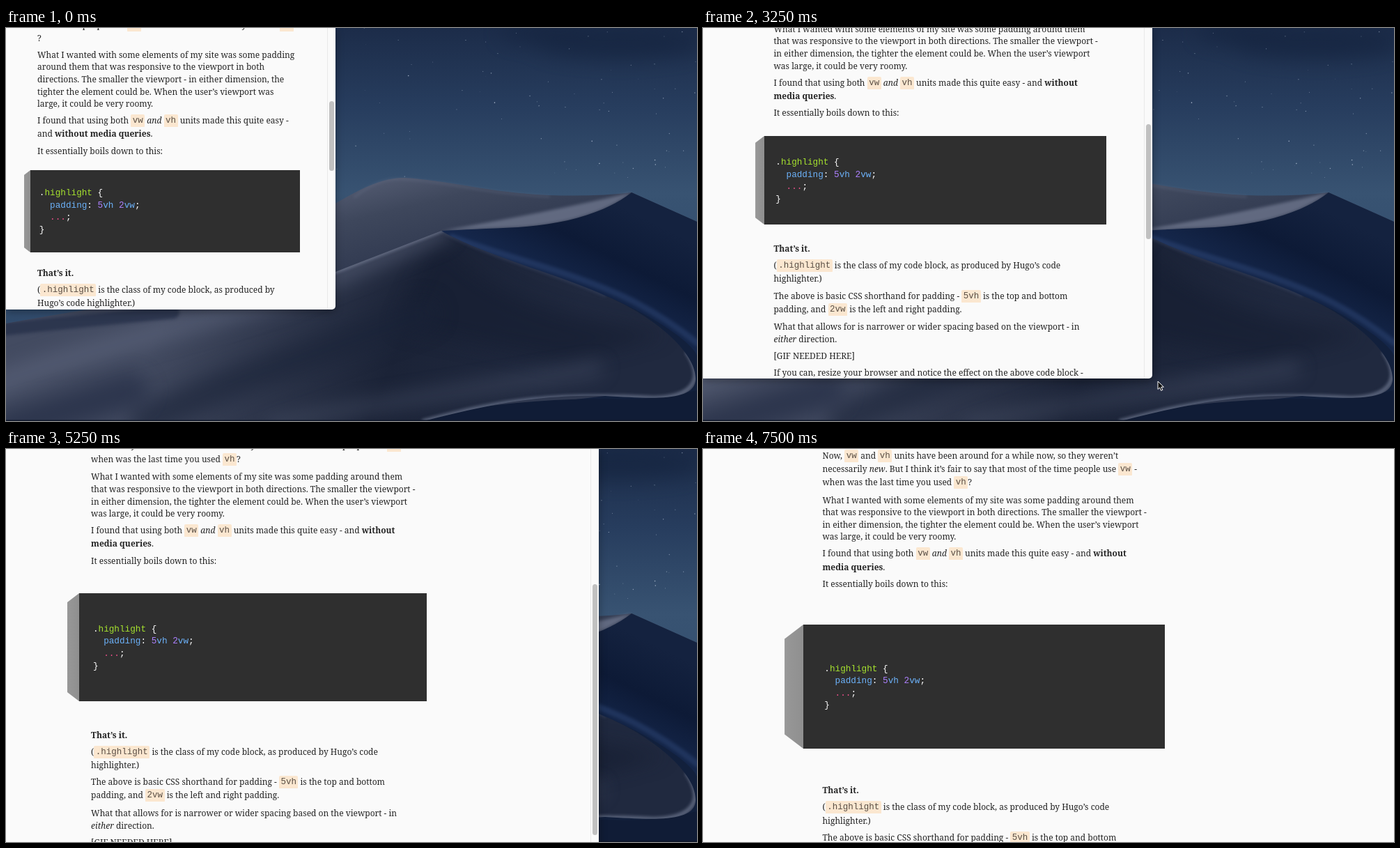
Recreate the animation shown at these times as an HTML page. Size 992 by 564 pixels, loop 8500 ms.

```html
<!DOCTYPE html>
<html lang="en">
<head>
<meta charset="utf-8">
<title>Responsive padding</title>
<style>
html, body { margin: 0; width: 100%; height: 100%; overflow: hidden; background: #16243f; }
#stage { position: relative; width: 992px; height: 564px; overflow: hidden; }
#stage > svg, #win, #win > * { position: absolute; }
#stage > svg { left: 0; top: 0; }
#win { left: 0; top: 0; overflow: hidden; background: #fafafa; border-radius: 0 0 5px 0;
  box-shadow: 0 3px 12px rgba(0,0,0,.35); font: 12px/17.6px "Noto Serif", serif; color: #242424; }
p { margin: 6.5px 0 0; }
#below p:first-child { margin: 0; }
p code { display: inline-block; vertical-align: top; height: 19.2px; padding: 0 2.5px;
  font: 12.5px/18.6px "Liberation Mono", monospace; color: #5a4f45;
  background: linear-gradient(#fbe7d0 18.4px, transparent 0); border-radius: 2px; }
br { display: none; }
.narrow br { display: inline; }
#block { background: #2f2f2f; }
#side { background: linear-gradient(90deg, #989898, #8f8f8f); }
pre { margin: 0; font: 12.7px/17.6px "Liberation Mono", monospace; color: #fff; }
pre b { font-weight: 400; color: #6cb2fa; }
pre i { font-style: normal; color: #ae81ff; }
pre u { text-decoration: none; color: #a6e22e; }
pre s { text-decoration: none; color: #f0508c; }
#track { top: 0; bottom: 0; right: 0; width: 11px; border-left: 1px solid #e9e9e9; }
#thumb { right: 2.5px; width: 7px; border-radius: 4px; }
</style>
</head>
<body>
<div id="stage">
  <svg width="992" height="564" stroke-linecap="round">
    <defs>
      <linearGradient id="sky" x2="0" y2="1">
        <stop stop-color="#1c2c49"/><stop offset=".2" stop-color="#273d5e"/>
        <stop offset=".42" stop-color="#385372"/><stop offset="1" stop-color="#2b4567"/>
      </linearGradient>
      <linearGradient id="back" gradientUnits="userSpaceOnUse" x1="560" y1="214" x2="590" y2="340">
        <stop stop-color="#50586e"/><stop offset=".35" stop-color="#3e475c"/><stop offset="1" stop-color="#2f384f"/>
      </linearGradient>
      <linearGradient id="shade" gradientUnits="userSpaceOnUse" x1="860" y1="245" x2="790" y2="385">
        <stop stop-color="#14223f"/><stop offset=".45" stop-color="#0d1a36"/><stop offset="1" stop-color="#172a50"/>
      </linearGradient>
      <linearGradient id="front" gradientUnits="userSpaceOnUse" x1="250" y1="350" x2="760" y2="560">
        <stop stop-color="#434b61"/><stop offset=".3" stop-color="#2f374c"/>
        <stop offset=".6" stop-color="#1b2337"/><stop offset="1" stop-color="#20293f"/>
      </linearGradient>
      <filter id="soft" filterUnits="userSpaceOnUse" x="-60" y="-60" width="1112" height="684" color-interpolation-filters="sRGB">
        <feGaussianBlur stdDeviation="14"/>
      </filter>
      <filter id="glow" filterUnits="userSpaceOnUse" x="-60" y="-60" width="1112" height="684" color-interpolation-filters="sRGB">
        <feGaussianBlur stdDeviation="2.2"/>
      </filter>
      <path id="dune" d="M0 424Q60 413 130 402C250 385 360 385 473 350Q555 318 625 291C680 324 800 356 860 384C920 408 992 462 990 505C988 536 930 532 860 528C760 526 690 541 600 564H0Z"/>
      <clipPath id="inDune"><use href="#dune"/></clipPath>
    </defs>
    <rect width="992" height="564" fill="url(#sky)"/>
    <g filter="url(#soft)" fill="#14233e" opacity=".65">
      <ellipse cx="880" cy="22" rx="120" ry="22"/><ellipse cx="780" cy="8" rx="70" ry="14"/>
    </g>
    <g id="stars" fill="#c3d0e2"></g>
    <path d="M400 300C480 245 530 214 572 215C640 219 690 236 780 240Q850 242 898 236L992 278V564H400Z" fill="url(#back)"/>
    <path d="M500 243C530 219 550 216 572 217C640 221 690 238 780 242" fill="none" stroke="#6f7890" stroke-width="2" opacity=".45" filter="url(#glow)"/>
    <path d="M898 236C860 266 800 282 735 286Q670 289 625 291Q790 262 898 236Z" fill="#757d94" opacity=".7" filter="url(#glow)"/>
    <path d="M898 236C860 266 800 282 735 286Q670 289 625 291L740 380L992 564V278Z" fill="url(#shade)"/>
    <path d="M860 384C920 408 985 450 992 470V564H560L860 528Z" fill="#12203c"/>
    <path d="M560 564Q720 532 860 532Q930 536 992 520V564Z" fill="#101c36"/>
    <path d="M640 300C720 330 820 352 900 392Q950 418 992 452" fill="none" stroke="#30497a" stroke-width="9" opacity=".45" filter="url(#glow)"/>
    <use href="#dune" fill="url(#front)"/>
    <g clip-path="url(#inDune)" fill="none">
      <path d="M620 300C680 370 760 410 950 440L800 480L560 430Z" fill="#171f33" opacity=".75" filter="url(#soft)"/>
      <path d="M-40 520C90 470 210 440 400 385L625 291" stroke="#666e86" stroke-width="28" opacity=".5" filter="url(#soft)"/>
      <path d="M-20 434Q110 420 240 408" stroke="#27314a" stroke-width="18" opacity=".8" filter="url(#glow)"/>
      <path d="M200 564C330 500 440 470 600 410" stroke="#1a2338" stroke-width="44" opacity=".6" filter="url(#soft)"/>
      <path d="M380 570C540 535 680 520 850 488" stroke="#5d667d" stroke-width="14" opacity=".5" filter="url(#soft)"/>
      <path d="M0 575L180 520" stroke="#242d45" stroke-width="50" opacity=".7" filter="url(#soft)"/>
      <path d="M978 466C1000 500 992 530 930 531C760 522 690 541 600 564" stroke="#8a94ad" stroke-width="6" opacity=".55" filter="url(#glow)"/>
      <path d="M473 350Q555 318 625 291" stroke="#858da3" stroke-width="5" opacity=".6" filter="url(#glow)"/>
      <path d="M625 291C680 324 800 356 860 384" stroke="#4b587a" stroke-width="3" opacity=".5" filter="url(#glow)"/>
    </g>
    <rect y="562.5" width="992" height="1.5" fill="#10182a"/>
  </svg>

  <div id="win">
    <div id="above">
      <p>Now, <code>vw</code> and <code>vh</code> units have been around for a while now, so they weren’t necessarily <em>new</em>. But I think it’s fair to say that most <br>of the time people use <code>vw</code>&nbsp;- when was the last time you used <code>vh</code><br>?</p>
      <p>What I wanted with some elements of my site was some padding around them that&nbsp;was responsive to the viewport in both directions. The smaller the viewport&nbsp;- in either dimension, the tighter the element could be. When the user’s viewport was large,&nbsp;it could be very roomy.</p>
      <p>I found that using both <code>vw</code> <em>and</em> <code>vh</code> units made this quite easy - and <strong>without media&nbsp;queries</strong>.</p>
      <p>It essentially boils down to this:</p>
    </div>
    <div id="side"></div>
    <div id="block"></div>
    <pre id="css">.<u>highlight</u> {
  <b>padding</b>: <i>5</i><b>vh</b> <i>2</i><b>vw</b>;
  <s>...</s>;
}</pre>
    <div id="below">
      <p><strong>That’s it.</strong></p>
      <p>(<code>.highlight</code> is the class of my code block, as produced by Hugo’s code highlighter.)</p>
      <p>The above is basic CSS shorthand for padding - <code>5vh</code> is the top and bottom padding,&nbsp;and <code>2vw</code> is the left and right padding.</p>
      <p>What that allows for is narrower or wider spacing based on the viewport - in <em>either</em>&nbsp;direction.</p>
      <p>[GIF NEEDED HERE]</p>
      <p>If you can, resize your browser and notice the effect on the above code block - that’s the CSS that I actually use for it.</p>
    </div>
    <div id="track"></div>
    <div id="thumb"></div>
  </div>

  <svg id="cursor" width="14" height="18">
    <path d="M1 1V12.5L3.7 10L5.6 14.4L7.8 13.4L5.9 9.2H9.4Z" fill="#0a0a0a" stroke="#fff"/>
  </svg>
</div>
<script>
const $ = id => document.getElementById(id);
const LOOP = 8500, STEP = 250;

// time, window width, window bottom, pointer x, pointer y
const KEYS = [
  [750, 473, 404, 615, 442],
  [1250, 473, 404, 505, 412],
  [1500, 473, 404, 470, 402],
  [1750, 473, 404, 464, 399],
  [2000, 473, 404, 464, 399],
  [2250, 488, 409, 495, 407],
  [2750, 578, 441, 587, 442],
  [3250, 645, 503, 653, 507],
  [3750, 689, 555, 687, 555],
  [5250, 851, 774, 851, 774],
  [5750, 940, 858, 940, 858],
  [6250, 1205, 966, 1205, 966],
  [6750, 1322, 1000, 1322, 1000],
  [7250, 1322, 1000, 1322, 1000],
  [7500, 1345, 1008, 1345, 1008]
];
// window bottom, top of the scroll thumb
const THUMB = [[404, 105], [441, 123], [555, 151], [774, 194]];

function sample(keys, at) {
  const i = keys.findIndex(k => k[0] > at);
  if (i === 0) return keys[0].slice(1);
  if (i < 0) return keys[keys.length - 1].slice(1);
  const a = keys[i - 1], b = keys[i], f = (at - a[0]) / (b[0] - a[0]);
  return a.slice(1).map((v, j) => v + (b[j + 1] - v) * f);
}

function place(id, left, top, width, height) {
  const s = $(id).style;
  s.left = left + "px";
  s.top = top + "px";
  if (width) s.width = width + "px";
  if (height) s.height = height + "px";
}

function draw(t) {
  const [w, h, cx, cy] = sample(KEYS, t);
  const wide = w > 620;
  const vw2 = w * .02, pad = 3.3 + h * .05;
  const x = wide ? 37 + w * .1 : w * .0952;
  const col = wide ? 465 : Math.min(465, w - 2 * x - 15);
  const extraLines = Math.max(0, Math.round((578 - w) / 26));
  const y = 129 + .142 * (h - 555) + 17.15 * extraLines;

  place("win", 0, 0, w, h);
  $("win").className = w < 500 ? "narrow" : "";

  const above = $("above").style;
  above.left = x + "px";
  above.width = col + 6 + "px";
  above.bottom = h - y - 9 + "px";

  const top = Math.round(y + 4.8 + pad), bottom = Math.round(y + 75.5 + 3 * pad);
  const left = Math.round(x - vw2 - .5), right = Math.round(x + col + vw2);
  place("block", left, top, right - left, bottom - top);
  place("side", left - vw2, top, vw2, bottom - top);
  const bevel = vw2 * .76;
  $("side").style.clipPath =
    `polygon(0 ${bevel}px, 100% 0, 100% 100%, 0 calc(100% - ${bevel}px))`;
  place("css", x + 2.8, top + pad + .8);
  place("below", x, bottom + pad - 2.3, col + 6);

  const [thumbTop] = sample(THUMB, h);
  place("thumb", w - 9.5, thumbTop, 7, (h + 66) ** 2 / (1960 + 62 * extraLines));
  $("thumb").style.background = t >= 1750 && t < 2250 ? "#7d7d7d" : "#c1c1c1";

  place("cursor", cx - 1, cy - 1);
  $("cursor").style.display = t < 750 ? "none" : "block";
}

let seed = 7;
const random = () => (seed = seed * 16807 % 2147483647) / 2147483647;
let stars = "";
for (let i = 0; i < 75; i++) {
  stars += `<circle cx="${475 + random() * 517}" cy="${random() * 220}" r="${.4 + random() * .4}" opacity="${.2 + random() * .6}"/>`;
}
$("stars").innerHTML = stars;

function tick() {
  const t = performance.now() % LOOP;
  draw(Math.floor(t / STEP) * STEP);
  requestAnimationFrame(tick);
}
tick();
</script>
</body>
</html>
```
